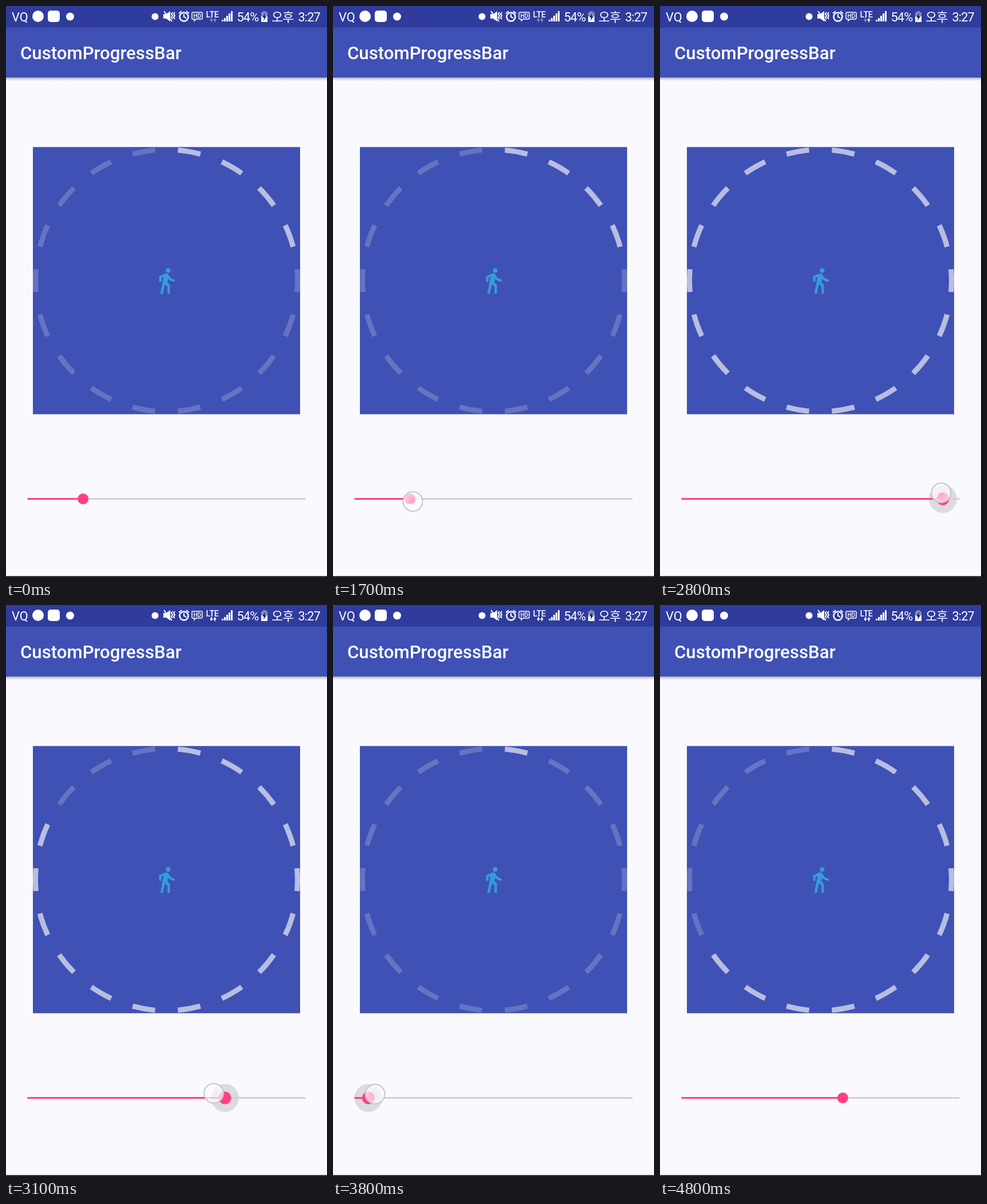
Recreate the animation shown at these times as an HTML page. Size 561x998 px, loop 5100 ms.

```html
<!DOCTYPE html>
<html lang="en">
<head>
<meta charset="utf-8">
<title>CustomProgressBar</title>
<style>
  html, body { margin: 0; width: 100%; height: 100%; overflow: hidden; background: #faf9fd; }
  svg { display: block; width: 100%; height: 100%; }
  text { font-family: Roboto, "Noto Sans CJK KR", "Noto Sans CJK", sans-serif; fill: #fff; }
  .status { font-size: 21.8px; letter-spacing: -.9px; }
  .ring { fill: none; stroke-width: 9; }
  .line { fill: none; stroke: #fff; stroke-width: 2; }
</style>
</head>
<body>
<svg viewBox="0 0 561 998">
  <defs>
    <linearGradient id="shadow" x2="0" y2="1">
      <stop stop-color="#000" stop-opacity=".32"/>
      <stop offset="1" stop-color="#000" stop-opacity="0"/>
    </linearGradient>
    <radialGradient id="glass">
      <stop stop-color="#fff" stop-opacity=".5"/>
      <stop offset="1" stop-color="#fff" stop-opacity=".75"/>
    </radialGradient>
  </defs>

  <rect width="561" height="998" fill="#faf9fd"/>
  <rect y="124" width="561" height="7" fill="url(#shadow)"/>
  <rect width="561" height="125" fill="#3f51b5"/>
  <rect width="561" height="37.5" fill="#2f3c9c"/>
  <rect y="996.5" width="561" height="1.5" fill="#111"/>

  <!-- Status bar -->
  <g fill="#fff">
    <text class="status" x="10" y="26.5" style="letter-spacing:0">VQ</text>
    <circle cx="56" cy="18" r="10"/>
    <rect x="73" y="8" width="21" height="20" rx="5"/>
    <circle cx="112" cy="18.5" r="7"/>
    <circle cx="260.500" cy="18.500" r="6"/>
    <path d="M275 14h5l7-5v18l-7-5h-5z"/>
    <path class="line" d="M276 9l14 18M291 11l-2 3 2 3-2 3 2 3M295 11l-2 3 2 3-2 3 2 3"/>
    <circle class="line" cx="311" cy="19" r="7.500" style="stroke-width:2.500"/>
    <path class="line" d="M311 14v5l4 2M302 13l5-4M320 13l-5-4"/>
    <path class="line" style="stroke-width:1.500" d="M327 11h14q2 0 2 2v8q0 2-2 2h-9l-3 3v-3h-2q-2 0-2-2v-8q0-2 2-2z"/>
    <text x="327.500" y="21" font-size="10" font-weight="500">HD</text>
    <text x="349.500" y="19.500" font-size="14.500" font-weight="500" letter-spacing="-.5">LTE</text>
    <path id="down" d="M358 21h2v3h2l-3 4-3-4h2z"/>
    <path id="up" d="M364 28h2v-3h2l-3-4-3 4h2z"/>
    <path d="M377 24h3v3h-3zM381 21h3v6h-3zM385 17h3v10h-3zM389 13h3v14h-3zM393 9h3v18h-3z"/>
    <text class="status" x="403.500" y="26.500">54%</text>
    <path d="M449 9h5v2h3v7h-11v-7h3z" opacity=".4"/>
    <path d="M446 18h11v10h-11z"/>
    <path d="M453 12l-5 8h3l-1 6 5-8h-3z" fill="#182052"/>
    <text class="status" x="464" y="26.500">오후</text>
    <text class="status" x="510.500" y="26.500">3:27</text>
  </g>
  <text x="25" y="93" font-size="31.200" font-weight="500">CustomProgressBar</text>

  <!-- Progress ring -->
  <rect x="47" y="246.500" width="467" height="467" fill="#3f51b5"/>
  <g transform="translate(280.500 480) rotate(-85)">
    <circle class="ring" r="229" pathLength="36" stroke="#6673c2" stroke-dasharray="1 1"/>
    <circle class="ring" id="lit" r="229" pathLength="36" stroke="#b8bde1"/>
  </g>
  <path transform="translate(255 454.800) scale(2.100)" fill="#359cda" d="M13.500 5.500c1.100 0 2-.9 2-2s-.9-2-2-2-2 .9-2 2 .9 2 2 2zM9.800 8.900L7 23h2.100l1.800-8 2.100 2v6h2v-7.500l-2.100-2 .6-3C14.800 12 16.800 13 19 13v-2c-1.900 0-3.500-1-4.300-2.400l-1-1.600c-.4-.6-1-1-1.700-1-.3 0-.5.1-.8.1L6 8.300V13h2V9.600z"/>

  <!-- Slider -->
  <circle id="halo" cy="861.500" r="24.500"/>
  <circle id="ripple" cy="861.500" r="20" opacity=".07"/>
  <path d="M37.500 861.500H523.500" stroke="#d1d0d6" stroke-width="3"/>
  <path id="track" stroke="#ff4081" stroke-width="3"/>
  <circle id="thumb" cy="861.500" fill="#ff4081"/>
  <circle id="touch" r="17" fill="url(#glass)" stroke="#c0c4de" stroke-width="2"/>
</svg>

<script>
  const LOOP = 5100, STEP = 100, DRAG_START = 1700;
  const TRACK_LEFT = 37.5, PIXELS_PER_PERCENT = 4.86;

  // Slider percent at each step of the drag
  const drag = [20, 22.5, 32, 46, 58, 68, 74, 82, 88, 93, 95, 94, 92.5, 82, 71, 61, 51,
                40, 28.5, 16, 8, 5, 11, 24, 37, 48, 53, 57, 58];
  const touchHeight = [[1700, 866], [2300, 860], [2800, 851], [3400, 856], [4200, 853.5], [4800, 853.5]];

  const part = id => document.getElementById(id);
  const set = (id, attributes) => {
    for (const name in attributes) part(id).setAttribute(name, attributes[name]);
  };
  const show = (id, visible) => set(id, { visibility: visible ? 'visible' : 'hidden' });

  function percentAt(time) {
    const index = Math.round((time - DRAG_START) / STEP);
    return drag[Math.max(0, Math.min(drag.length - 1, index))];
  }

  function interpolate(points, time) {
    const next = points.findIndex(([at]) => at > time);
    if (next < 1) return points[next < 0 ? points.length - 1 : 0][1];
    const [t0, v0] = points[next - 1], [t1, v1] = points[next];
    return v0 + (v1 - v0) * (time - t0) / (t1 - t0);
  }

  function draw(time) {
    const percent = percentAt(time);
    const x = TRACK_LEFT + Math.round(percent) * PIXELS_PER_PERCENT;
    const count = Math.min(18, Math.ceil(Math.round(percent) / 5));
    const lead = (percentAt(time + STEP) - percent) * PIXELS_PER_PERCENT * .4;
    const pressed = time >= 1900 && time <= 4600;

    set('lit', { 'stroke-dasharray': '1 1 '.repeat(count - 1) + '1 36' });
    set('track', { d: `M${TRACK_LEFT} 861.5H${x}` });
    set('thumb', { cx: x, r: pressed ? 11 : time === 4700 ? 10.2 : 9.5 });
    set('halo', { cx: x, opacity: time === 1800 || time === 4500 ? .06 : .12 });
    show('halo', time >= 1800 && time <= 4500);
    set('ripple', { cx: x });
    show('ripple', time >= 1900 && time <= 2400);
    set('touch', { cx: x + lead, cy: interpolate(touchHeight, time) });
    show('touch', time >= DRAG_START && time <= 4400);
    set('up', { opacity: time >= 2700 ? 1 : .4 });
    set('down', { opacity: time >= 2900 ? 1 : .4 });
  }

  function frame(now) {
    draw(Math.floor(now % LOOP / STEP) * STEP);
    requestAnimationFrame(frame);
  }
  frame(performance.now());
</script>
</body>
</html>
```
